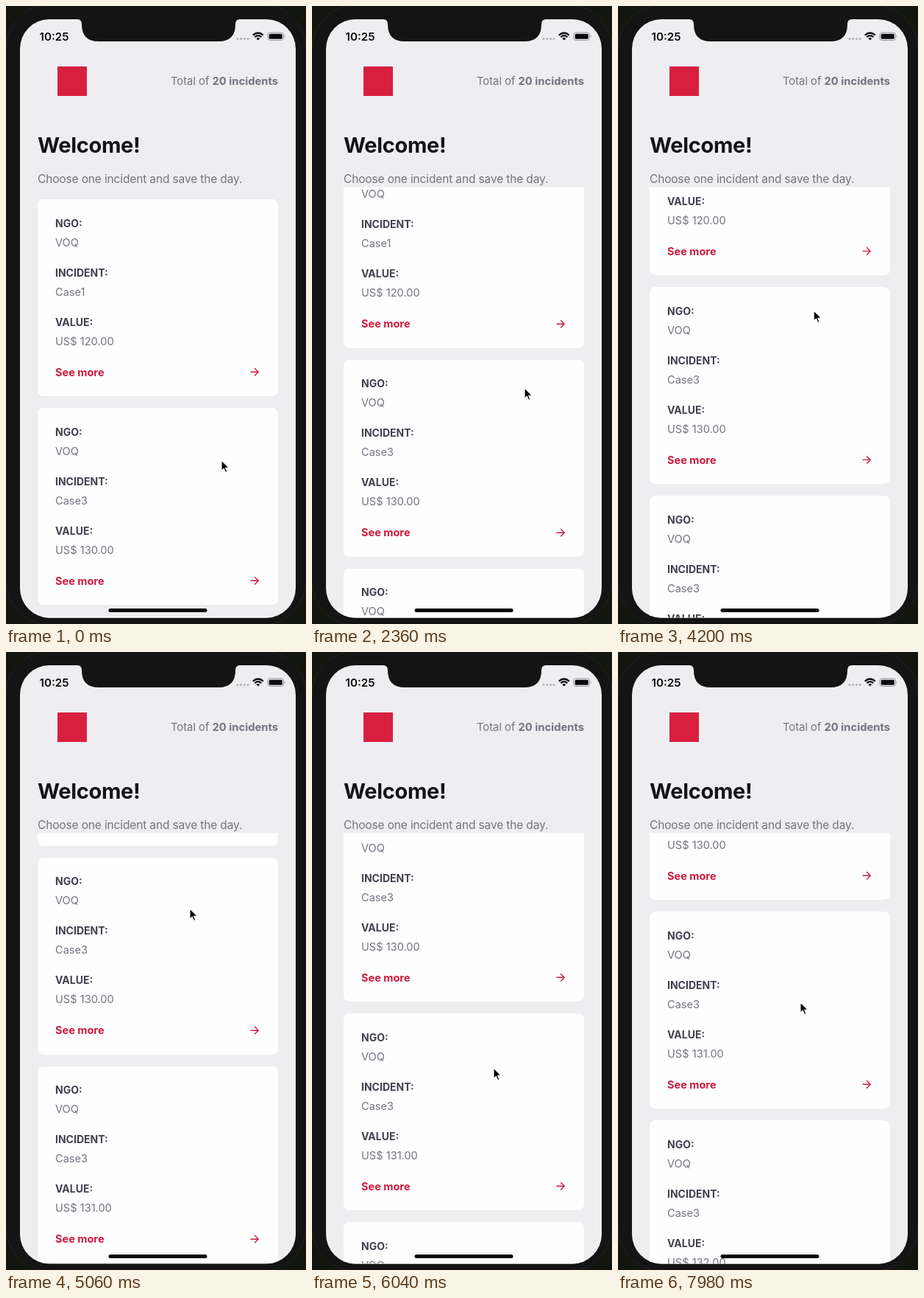
Write an HTML page that moves like this. It is 408 px wide and 838 px high and loops after 8 s.

```html
<!DOCTYPE html>
<html lang="en">
<head>
<meta charset="utf-8">
<title>Incident list</title>
<style>
  html, body { margin: 0; width: 100%; height: 100%; overflow: hidden; background: #12160f; }
  svg { display: block; width: 100%; height: 100%; font-family: Inter, "Open Sans", sans-serif; }
  .time { font-size: 15.2px; font-weight: 600; fill: #0a0a0c; }
  .total { font-size: 14.75px; fill: #737380; }
  .title { font-size: 29px; font-weight: 700; letter-spacing: -.012em; fill: #13131a; }
  .intro { font-size: 15.5px; letter-spacing: -.009em; fill: #737380; }
  .label { font-size: 14px; font-weight: 700; fill: #41414d; }
  .value { font-size: 14.6px; fill: #737380; }
  .more { font-size: 14.5px; font-weight: 700; fill: #cc1c3e; }
  .bold { font-weight: 700; }
</style>
</head>
<body>
<svg viewBox="0 0 408 838" preserveAspectRatio="none">
  <defs>
    <clipPath id="screen"><rect x="19" y="18" width="375" height="811.5" rx="40"/></clipPath>
    <clipPath id="window"><rect x="19" y="245.5" width="375" height="600"/></clipPath>
  </defs>
  <rect width="408" height="838" fill="#12160f"/>
  <rect x="-.5" y="-2" width="409" height="842" rx="62" fill="#141414" stroke="#222220"/>
  <g clip-path="url(#screen)">
    <rect x="19" y="18" width="375" height="812" fill="#eeeef0"/>
    <rect x="70" y="82" width="40" height="40" fill="#d81f40"/>
    <text class="total" x="370" y="107" text-anchor="end">Total of <tspan class="bold">20 incidents</tspan></text>
    <text class="title" x="43" y="199">Welcome!</text>
    <text class="intro" x="43" y="240">Choose one incident and save the day.</text>
    <g clip-path="url(#window)"><g id="list"></g></g>
    <path d="M97 17V18Q103 18 103 25Q103 48 126 48H289Q312 48 312 25Q312 18 318 18V17Z" fill="#141414"/>
    <text class="time" x="45.5" y="46.5">10:25</text>
    <g fill="#b6b6ba">
      <circle cx="315" cy="44.5" r="1.6"/><circle cx="319.7" cy="44.5" r="1.6"/>
      <circle cx="324.4" cy="44.5" r="1.6"/><circle cx="329" cy="44.5" r="1.6"/>
    </g>
    <g fill="none" stroke="#0a0a0c" stroke-width="2.2">
      <path d="M335.8 39.6Q342.8 33.4 349.8 39.6"/>
      <path d="M338.3 42.2Q342.8 38.2 347.3 42.2"/>
    </g>
    <path d="M340.3 44Q342.8 42 345.3 44L342.8 46.6Z" fill="#0a0a0c"/>
    <rect x="356" y="36" width="21.5" height="10.5" rx="3" fill="none" stroke="#98989c"/>
    <rect x="357.7" y="37.7" width="18.1" height="7.1" rx="1.6" fill="#0a0a0c"/>
    <path d="M378.7 39.5Q380.6 41.2 378.7 43Z" fill="#98989c"/>
    <rect x="139.5" y="817" width="134" height="5" rx="2.5" fill="#060608"/>
  </g>
  <path id="cursor" d="M0 0V14.2L3.3 11.2L5.6 16.6L7.9 15.6L5.6 10.3H10.2Z" fill="#060608"
        stroke="#fff" stroke-width="1.1" stroke-linejoin="round"/>
</svg>
<script>
const LOOP = 8000, STEP = 283;
const list = document.getElementById("list");
const cursor = document.getElementById("cursor");

const cases = [["Case1", 120], ["Case3", 130], ["Case3", 131], ["Case3", 132]];

const text = (cls, y, str) => `<text class="${cls}" x="24" y="${y}">${str}</text>`;
const field = (y, name, value) => text("label", y, name + ":") + text("value", y + 26, value);

list.innerHTML = cases.map(([name, value], i) => `
  <g transform="translate(43 ${262 + i * STEP})">
    <rect width="327" height="267" rx="8" fill="#fefefe"/>
    ${field(37.5, "NGO", "VOQ")}
    ${field(104.5, "INCIDENT", name)}
    ${field(171.5, "VALUE", `US$ ${value}.00`)}
    ${text("more", 239.5, "See more")}
    <path d="M289.5 234.3H300M295.2 229.2L300.2 234.3L295.2 239.4" fill="none" stroke="#cc1c3e" stroke-width="1.4"/>
  </g>`).join("");

// Each track holds [time, value] pairs.
const scroll = track([[0, 0], [1660, 0], [2360, 65], [3380, 107], [4700, 211], [5060, 266],
  [6040, 338], [6860, 360], [7100, 364], [7980, 476]]);
const cursorX = track([[0, 293], [2360, 289], [3380, 283], [5060, 250], [6040, 247], [6860, 243], [7980, 248]]);
const cursorY = track([[0, 616], [1560, 592], [2360, 518], [3380, 474], [4700, 370], [4960, 347],
  [5060, 348], [6040, 564], [6860, 592], [7080, 598], [7980, 475]]);

// Monotone cubic interpolation, so nothing overshoots its keys.
function track(keys) {
  const rate = i => (keys[i + 1][1] - keys[i][1]) / (keys[i + 1][0] - keys[i][0]);
  const last = keys.length - 1;
  const slopes = keys.map((_, i) => {
    if (i === 0) return rate(0);
    if (i === last) return rate(last - 1);
    const a = rate(i - 1), b = rate(i);
    return a * b > 0 ? 2 * a * b / (a + b) : 0;
  });
  return t => {
    if (t >= keys[last][0]) return keys[last][1];
    const i = keys.findIndex(k => k[0] > t) - 1;
    const [t0, v0] = keys[i], [t1, v1] = keys[i + 1];
    const d = t1 - t0, u = (t - t0) / d, w = 1 - u;
    return w * w * ((1 + 2 * u) * v0 + u * d * slopes[i])
         + u * u * ((1 + 2 * w) * v1 - w * d * slopes[i + 1]);
  };
}

function draw(t) {
  list.setAttribute("transform", `translate(0 ${-scroll(t).toFixed(1)})`);
  cursor.setAttribute("transform", `translate(${cursorX(t).toFixed(1)} ${cursorY(t).toFixed(1)})`);
}

const start = performance.now();
function tick() {
  draw((performance.now() - start) % LOOP);
  requestAnimationFrame(tick);
}
draw(0);
requestAnimationFrame(tick);
</script>
</body>
</html>
```
